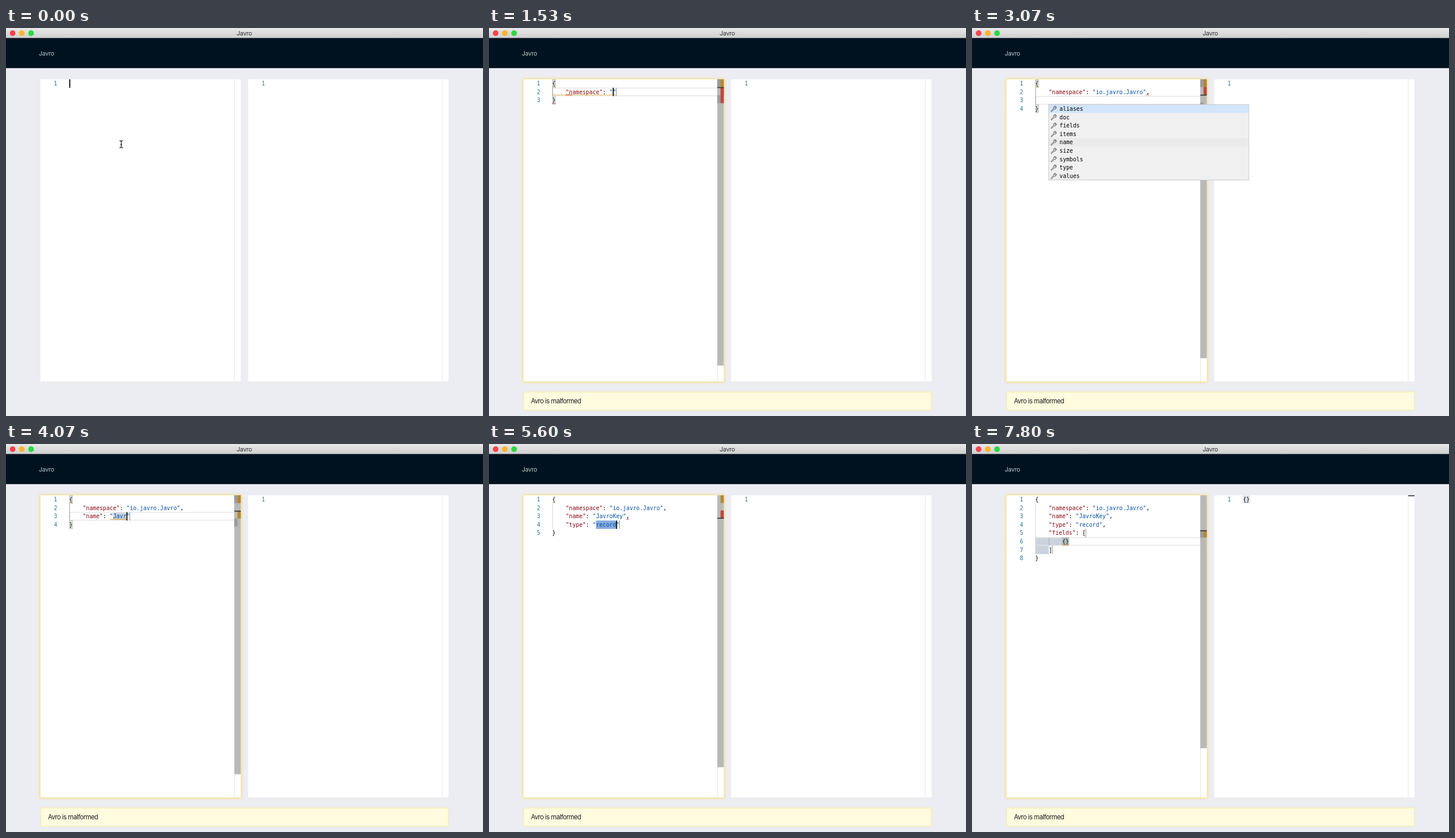
These frames come from a looping animation (830 by 675 pixels, 8000 ms). An HTML page:

```html
<!DOCTYPE html>
<html lang="en">
<head>
<meta charset="utf-8">
<title>Javro</title>
<style>
html, body { margin: 0; width: 100%; height: 100%; overflow: hidden; background: #ecedf2; }
svg { display: block; width: 830px; height: 675px; }
.ui { font: 10.7px Inter, Roboto, sans-serif; letter-spacing: -.03em; }
.code { font: 9.72px "DejaVu Sans Mono", "Liberation Mono", monospace; white-space: pre; }
.num { fill: #237893; text-anchor: end; }
</style>
</head>
<body>
<svg viewBox="0 0 830 675" xmlns="http://www.w3.org/2000/svg">
  <defs>
    <linearGradient id="bar" x2="0" y2="1">
      <stop offset="0" stop-color="#e8e8e8"/><stop offset="1" stop-color="#cecece"/>
    </linearGradient>
    <filter id="blur" x="-5%" y="-5%" width="110%" height="110%"><feGaussianBlur stdDeviation="2.3"/></filter>
    <path id="wrench" d="M1.2 9.3L5.6 4.9A2.8 2.8 0 0 1 9 1.2L7.3 2.9L8.3 4L10.1 2.3A2.8 2.8 0 0 1 6.6 6L2.4 10.4A.8 .8 0 0 1 1.2 9.3Z" fill="none" stroke="#424242" stroke-width=".9"/>
  </defs>
  <rect width="830" height="675" fill="#ecedf2"/>
  <rect width="830" height="18" fill="url(#bar)"/>
  <rect y="17.4" width="830" height="52.4" fill="#001220"/>
  <circle cx="11.5" cy="9" r="4.9" fill="#fa434b"/>
  <circle cx="27.5" cy="9" r="4.9" fill="#fdb42c"/>
  <circle cx="43.6" cy="9" r="4.9" fill="#2cd842"/>
  <text class="ui" x="414.5" y="13" text-anchor="middle" fill="#333">Javro</text>
  <text class="ui" x="57" y="47.8" fill="#bcc3c9">Javro</text>
  <rect id="glow" x="58.5" y="88" width="351.5" height="528.5" fill="#f9dd80" filter="url(#blur)"/>
  <rect x="60" y="89.3" width="348.5" height="525.6" fill="#fff"/>
  <rect x="421.3" y="89.3" width="348.7" height="525.6" fill="#fff"/>
  <path d="M397.5 89.5V615M759 89.5V615" stroke="#e6e6e8"/>
  <text class="code num" x="450.6" y="100">1</text>
  <g id="json">
    <path d="M471.8 90h5.4v13h-5.4zM477.7 90h5.4v13h-5.4z" fill="#e3e7e8" stroke="#d2d4d8" stroke-width=".6"/>
    <text class="code" x="471.5" y="100">{}</text>
    <rect x="759" y="89.3" width="11" height="1.5" fill="#222"/>
  </g>
  <g id="msg">
    <rect x="60.3" y="633.2" width="709.4" height="31.6" rx="1" fill="#fefbdf" stroke="#fbe89a"/>
    <text class="ui" x="73" y="653.2" style="font-size:11.2px;letter-spacing:-.045em" fill="#1c1c1c">Avro is malformed</text>
  </g>
  <g id="mouse" fill="none" stroke="#222" stroke-width="1.2">
    <path d="M197.5 195.8q3 0 3 2.2q0-2.2 3-2.2M200.5 198v8.2M197.5 208.4q3 0 3-2.2q0 2.2 3 2.2M199 202.8h3"/>
  </g>
  <g id="editor"></g>
</svg>
<script>
const $ = id => document.getElementById(id);
const LOOP = 8000, X0 = 110.1, Y0 = 89.3, CW = 5.85, LH = 14.6, VIEW = 525.6;
const colX = c => X0 + c * CW;
const rowY = r => Y0 + r * LH;

// "|" marks the caret
const obj = (...lines) => '{\n' + lines.map(l => '    ' + l).join('\n') + '\n}';
const NS = '"namespace": "io.javro.Javro"';
const NAME = '"name": "JavroKey"';
const TYPE = '"type": "record"';
const ALL = ['aliases', 'doc', 'fields', 'items', 'name', 'size', 'symbols', 'type', 'values'];
const REST = ALL.filter(w => w !== 'name');

const steps = [];
const add = (t, text, o = {}) => steps.push({ t, text, glow: 1, yellow: [[0, 0, 1]], red: [], ...o });
// types word into a template, one key per time
const type = (times, word, from, line, opts) =>
  times.forEach((t, i) => add(t, line(word.slice(0, from + i + 1) + '|'), opts(from + i + 1)));

add(0, '|', { glow: 0, idle: true, yellow: [] });
add(270, '{|}', { glow: .5, yellow: [] });
add(330, '{|}');

const endErr = { red: [[2, 0, 1]] };
add(470, obj('|'));
add(530, obj('|'), endErr);
add(670, obj('|'), { ...endErr, list: [0, 0, [...ALL.slice(0, 5), 'namespace', ...ALL.slice(5)].slice(0, 10)] });
add(800, obj('n|'), { ...endErr, list: [1, 1, ['name', 'namespace']] });
add(870, obj('na|'), endErr);
add(1000, obj('na|'), { ...endErr, list: [2, 2, ['name', 'namespace']] });
const keyErr = { yellow: [[0, 0, 1], [1, 0, 19]], red: [[1, 4, 2], [2, 0, 1]] };
type([1200, 1270, 1330, 1400], 'namesp', 2, s => obj(s), n =>
  ({ ...keyErr, list: [2, n, n < 5 ? ['name', 'namespace'] : ['namespace']] }));
add(1470, obj('"namespace": "|"'), { ...keyErr, marks: [[1, 19]] });

type([1600, 1670, 1800, 1870, 1930, 2000, 2070, 2130, 2200, 2400, 2470, 2530, 2600, 2670],
  'io.javro.Javro', 0, s => obj(`"namespace": "${s}"`), n => ({ marks: [[1, 19 + n]], hold: [[1, 18, n]] }));
add(2730, obj(NS + '|'));
add(2800, obj(NS + ',|'));
add(2870, obj(NS + ',', '|'));
const comma2 = { red: [[1, 33, 1]] };
add(3070, obj(NS + ',', '|'), { ...comma2, off: true, list: [0, 0, ALL] });
add(3200, obj(NS + ',', 'n|'), { ...comma2, list: [1, 1, ['name']] });
add(3330, obj(NS + ',', 'na|'), comma2);
add(3400, obj(NS + ',', 'na|'), { ...comma2, list: [2, 2, ['name']] });
type([3600, 3670], 'name', 2, s => obj(NS + ',', s), n => ({ ...comma2, list: [2, n, ['name']] }));
add(3800, obj(NS + ',', '"name": "|"'), { marks: [[2, 14]] });
type([3870, 3930, 4000, 4070, 4130, 4200, 4270, 4400], 'JavroKey', 0,
  s => obj(NS + ',', `"name": "${s}"`), n =>
  ({ marks: [[2, 14 + n]], hold: [[2, 13, n]], yellow: [[0, 0, 1], [2, 12, n + 1]] }));

const two = [NS + ',', NAME + ','];
const comma3 = { red: [[2, 22, 1]] };
add(4470, obj(NS + ',', NAME + '|'));
add(4600, obj(NS + ',', NAME + ',|'));
add(4670, obj(...two, '|'));
add(4730, obj(...two, '|'), comma3);
add(4870, obj(...two, '|'), { ...comma3, list: [0, 0, REST] });
add(5070, obj(...two, '|'), { ...comma3, off: true, list: [0, 0, REST] });
add(5270, obj(...two, 't|'), { ...comma3, list: [1, 1, ['type']] });
add(5400, obj(...two, 'ty|'), { ...comma3, list: [1, 2, ['type']] });
add(5600, obj(...two, '"type": "record|"'), { ...comma3, pick: [[3, 13, 6]], marks: [[3, 20]], pairs: [] });
add(5800, obj(...two, TYPE + '|'));
add(5930, obj(...two, TYPE + ',|'));

const three = [...two, TYPE + ','];
const comma4 = { red: [[3, 20, 1]] };
add(6070, obj(...three, '|'));
add(6200, obj(...three, '|'), comma4);
add(6400, obj(...three, 'f|'), comma4);
add(6600, obj(...three, 'fi|'), { ...comma4, list: [2, 2, ['fields']] });
[[6800, .6], [6870, .3], [7000, 0]].forEach(([t, glow]) =>
  add(t, obj(...three, '"fields": [|]'),
    { glow, valid: true, json: true, yellow: [], marks: [[4, 16]], pairs: [[4, 14], [4, 15]] }));

const hold = [[5, 0, 8], [6, 0, 4]], marks = [[4, 15], [6, 5]];
add(7200, obj(...three, '"fields": [', '    |', ']'),
  { glow: 0, valid: true, json: true, yellow: [], hold, marks, pairs: [] });
[[7330, .25], [7400, .6], [7470, 1], [7800, 1]].forEach(([t, glow]) =>
  add(t, obj(...three, '"fields": [', '    {|}', ']'), {
    glow, json: true, yellow: [[5, 8, 2]], marks, off: t === 7800,
    hold: [[5, 0, 10], hold[1]], pairs: [[5, 8], [5, 9]]
  }));

const rect = (x, y, w, h, fill, more = '') =>
  `<rect x="${x}" y="${y}" width="${w}" height="${h}" fill="${fill}" ${more}/>`;
const text = (x, y, s, fill = '#000', more = 'class="code"') =>
  `<text x="${x}" y="${y}" fill="${fill}" ${more}>${s}</text>`;
const block = fill => ([r, c, n]) => rect(colX(c), rowY(r), n * CW, LH, fill);

function wave(color) {
  return ([r, c, n]) => {
    const x = colX(c), y = rowY(r) + LH - 1, end = x + n * CW;
    let d = `M${x} ${y}`;
    for (let i = 1; x + i * 2.2 <= end + .5; i++) d += `L${x + i * 2.2} ${y - (i % 2) * 2.2}`;
    return `<path d="${d}" fill="none" stroke="${color}" stroke-width="1"/>`;
  };
}

function tokens(line, r) {
  const y = rowY(r) + 10.7;
  return [...line.matchAll(/"[^"]*"|[^\s"]+/g)].map(m => {
    const key = line[m.index + m[0].length] === ':';
    const fill = m[0][0] !== '"' ? '#000' : key ? '#8a0a14' : '#0451a5';
    return text(colX(m.index), y, m[0], fill);
  }).join('');
}

function popup([anchor, typed, words], row) {
  const x = colX(4 + anchor), y = rowY(row + 1), h = words.length * LH;
  let s = rect(x, y, 348.3, h, '#f0f0f0');
  words.forEach((w, i) => {
    const top = y + i * LH;
    if (!i) s += rect(x, top, 348.3, LH, '#d2e5fa');
    else if (top < 202 && top + LH > 202) s += rect(x, top, 348.3, LH, '#eaeaea');
    s += `<use href="#wrench" x="${x + 3}" y="${top + 1.8}"/>`;
    s += text(x + 18.8, top + 10.9,
      `<tspan fill="#0066bf" font-weight="bold">${w.slice(0, typed)}</tspan>${w.slice(typed)}`);
  });
  return s + rect(x, y, 348.3, h, 'none', 'stroke="#c3c5c8" stroke-width=".9"');
}

function ruler(st, n, row, pairs) {
  const h = LH * VIEW / (VIEW + (n - 1) * LH), at = r => Y0 + r * h;
  let s = n > 1 ? rect(397.3, Y0, 11.2, VIEW * h / LH, '#b8b8b8') : '';
  pairs.forEach(([r]) => s += rect(397.3, at(r), 5.6, h, '#9b9b9b'));
  st.yellow.forEach(([r]) => s += rect(402.9, at(r), 5.6, h, '#b48830'));
  st.red.forEach(([r]) => s += rect(402.9, at(r), 5.6, h, '#c0463f'));
  return s + (st.idle ? '' : rect(397.3, at(row) - .3, 11.2, 1.6, '#333'));
}

function draw(st) {
  const before = st.text.split('|')[0].split('\n');
  const row = before.length - 1, col = before[row].length;
  const lines = st.text.replace('|', '').split('\n'), n = lines.length;
  const outer = !st.pairs && !st.idle;
  const pairs = st.pairs || (st.idle ? [] : n > 1 ? [[0, 0], [n - 1, 0]] : [[0, 0], [0, 1]]);
  let s = (st.hold || []).map(block('#cad3dd')).join('') + (st.pick || []).map(block('#84acdd')).join('');
  if (row && !st.pick)
    s += rect(X0 + .6, rowY(row) + .6, 286.6, LH - 1.2, 'none', 'stroke="#e3e3e5" stroke-width="1.3"');
  if (n > 1)
    s += rect(X0 + .1, rowY(1), .9, (n - 2) * LH, outer ? '#939393' : '#d0d0d0');
  if (n === 8) s += rect(colX(4) + .1, rowY(5), .9, LH, '#a5adb5');
  s += pairs.map(([r, c]) => rect(colX(c) + .3, rowY(r) + .6, CW - .5, LH - 1.2,
    'rgba(0,100,0,.1)', 'stroke="#a9a9a9" stroke-width=".8"')).join('');
  lines.forEach((l, i) => {
    s += text(89.2, rowY(i) + 10.7, i + 1, '#237893', 'class="code num"') + tokens(l, i);
  });
  s += st.yellow.map(wave('#dca52a')).join('') + st.red.map(wave('#d8202a')).join('');
  s += (st.marks || []).map(([r, c]) => rect(colX(c) - .3, rowY(r), .9, LH, '#7d8085')).join('');
  if (!st.off) s += rect(colX(col), rowY(row), 1.7, LH, '#000');
  s += ruler(st, n, row, pairs);
  if (st.list) s += popup(st.list, row);

  $('editor').innerHTML = s;
  $('glow').setAttribute('opacity', st.glow);
  const show = (id, on) => $(id).setAttribute('visibility', on ? 'visible' : 'hidden');
  show('msg', !st.idle && !st.valid);
  show('json', st.json);
  show('mouse', st.idle);
}

let shown;
function tick() {
  const t = performance.now() % LOOP;
  const now = steps.findLast(st => st.t <= t);
  if (now !== shown) draw(shown = now);
  requestAnimationFrame(tick);
}
tick();
</script>
</body>
</html>
```
